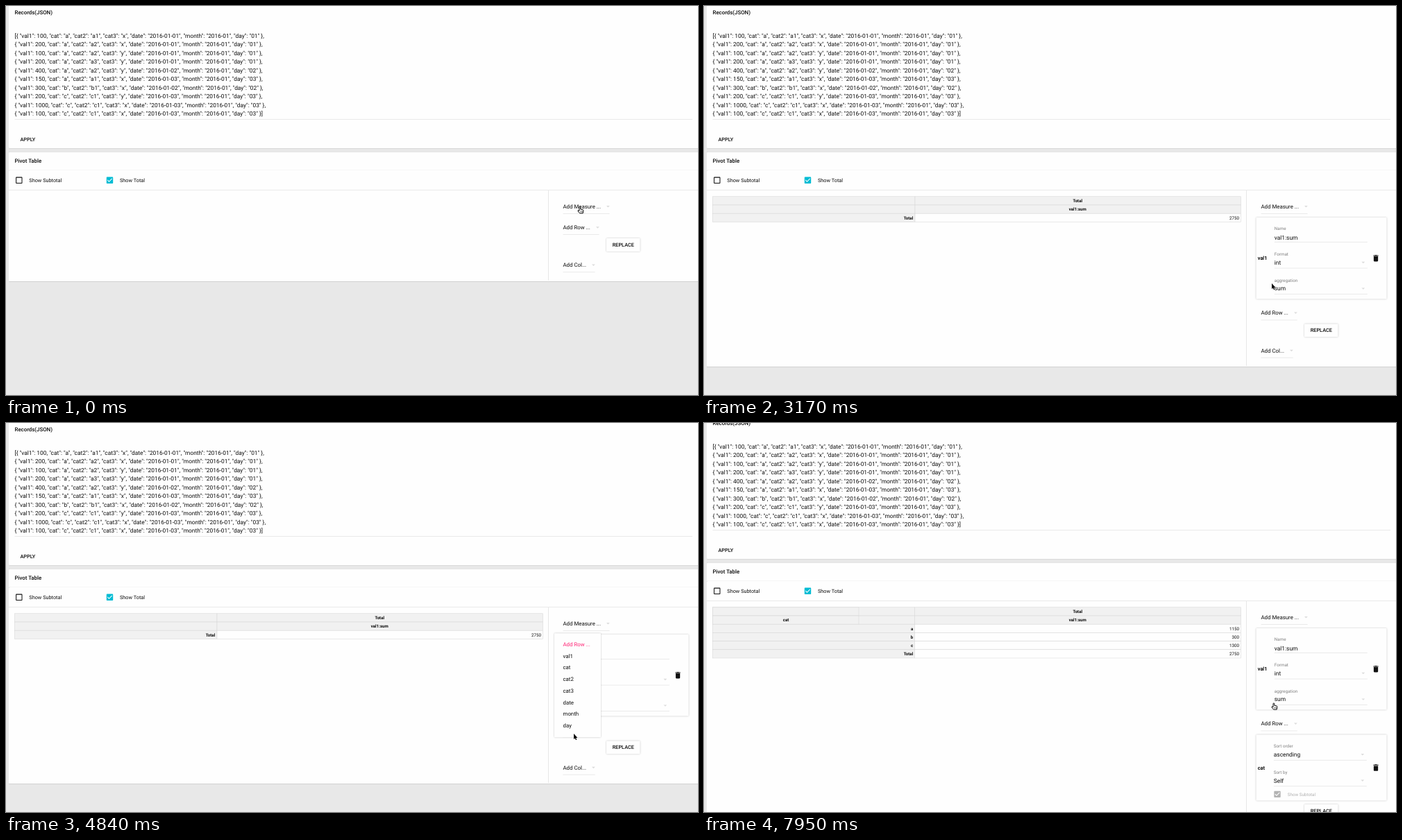
These frames come from a looping animation (997 px wide and 561 px high, 8000 ms). An HTML page:

```html
<!DOCTYPE html>
<html lang="en">
<head>
<meta charset="utf-8">
<title>Pivot table</title>
<style>
html, body { margin: 0; width: 100%; height: 100%; overflow: hidden; background: #e8e8e8; }
svg { display: block; width: 997px; height: 561px; font-family: Roboto, sans-serif; text-rendering: geometricPrecision; white-space: pre; }
.paper { fill: #fefefe; filter: drop-shadow(0 .9px .6px rgba(0,0,0,.45)); }
.raised { fill: #fefefe; filter: drop-shadow(0 .7px .9px rgba(0,0,0,.24)); }
</style>
</head>
<body>
<svg id="stage" viewBox="0 0 997 561"></svg>
<script>
const LOOP = 8000;
const INK = '#0c0c0c', LABEL = '#808080', RULE = '#e2e2e2', PINK = '#ff2475';
const SMALL = 6.28, BODY = 7.32, MEDIUM = 7.85, LARGE = 8.37;
const FIELDS = ['val1', 'cat', 'cat2', 'cat3', 'date', 'month', 'day'];
const ROW_H = 16.72;

const RECORDS = [
  [100, 'a', 'a1', 'x', 1], [200, 'a', 'a2', 'x', 1], [100, 'a', 'a2', 'y', 1],
  [200, 'a', 'a3', 'y', 1], [400, 'a', 'a2', 'y', 2], [150, 'a', 'a1', 'x', 3],
  [300, 'b', 'b1', 'x', 2], [200, 'c', 'c1', 'y', 3], [1000, 'c', 'c1', 'x', 3],
  [100, 'c', 'c1', 'x', 3]
].map(([val, cat, cat2, cat3, day], i, all) =>
  `${i ? '' : '['}{ "val1": ${val}, "cat": "${cat}", "cat2": "${cat2}", "cat3": "${cat3}", ` +
  `"date": "2016-01-0${day}", "month": "2016-01", "day": "0${day}" }${i < all.length - 1 ? ',' : ']'}`);

const ICON = {
  box: 'M19 5v14H5V5h14m0-2H5c-1.1 0-2 .9-2 2v14c0 1.1.9 2 2 2h14c1.1 0 2-.9 2-2V5c0-1.1-.9-2-2-2z',
  checked: 'M19 3H5c-1.11 0-2 .9-2 2v14c0 1.1.89 2 2 2h14c1.11 0 2-.9 2-2V5c0-1.1-.89-2-2-2zm-9 14l-5-5 1.41-1.41L10 14.17l7.59-7.59L19 8l-9 9z',
  trash: 'M6 19c0 1.1.9 2 2 2h8c1.1 0 2-.9 2-2V7H6v12zM19 4h-3.5l-1-1h-5l-1 1H5v2h14V4z'
};
const CURSOR = {
  hand: '<path d="M-1 .8C-1-.3.8-.3.8.8V3.4L4 4Q5.1 4.3 4.9 5.5L4.2 9.2H-.4L-2.9 6.2Q-3.3 4.6-2 4.9L-1 5.8Z" fill="#fff" stroke="#000" stroke-width=".95" stroke-linejoin="round"/>' +
    '<path d="M.9 5.6V7.8M2.1 5.6V7.8M3.3 5.6V7.8" stroke="#000" stroke-width=".5"/>',
  arrow: '<path d="M0 0V8L1.8 6.4 3 9.2 4.3 8.6 3.1 5.9H5.4Z" stroke="#fff" stroke-width=".8" paint-order="stroke"/>'
};

// Timelines: [start ms, value], each held until the next entry
const POINTER = [
  [0, ['hand', 827, 289.7]], [210, ['hand', 830.5, 290.2]], [770, ['hand', 829, 292]],
  [1130, ['hand', 827, 298]], [1300, ['hand', 826, 302]], [1480, ['hand', 825.3, 306.3]],
  [2990, ['arrow', 821, 356]], [3170, ['arrow', 818, 400]], [3560, ['arrow', 818, 412]],
  [3730, ['arrow', 818, 430]], [4120, ['arrow', 818, 448]], [5030, ['hand', 817, 432]],
  [5220, ['hand', 816, 416]], [5420, ['hand', 815, 400]], [5610, ['hand', 813, 383]],
  [5800, ['hand', 812, 366]], [5980, ['hand', 812, 353]], [7590, ['hand', 821, 404]]
];
const SCROLL = [[0, 0], [3560, -2], [3730, -1], [4120, 0], [7950, -9]];
const MEASURE_MENU = [
  [0, null], [770, { opacity: .85 }], [950, {}], [1300, { hover: 0 }],
  [2010, { hover: 0, opacity: .5, scale: .445 }], [2190, null]
];
const ROW_MENU = [
  [0, null], [4480, {}], [5030, { hover: 6 }], [5220, { hover: 5 }], [5420, { hover: 4 }],
  [5610, { hover: 3 }], [5800, { hover: 2 }], [5980, { hover: 1 }],
  [6880, { hover: 1, ripple: true }], [7120, null]
];
const at = (line, t) => line.filter(([start]) => start <= t).pop()[1];

// y is the vertical middle of the capitals
const text = (s, x, y, size, { fill = INK, weight = 400, anchor = 'start' } = {}) =>
  `<text x="${x}" y="${y + size * .36}" font-size="${size}" font-weight="${weight}" fill="${fill}" text-anchor="${anchor}">${s}</text>`;
const rect = (x, y, w, h, fill, extra = '') =>
  `<rect x="${x}" y="${y}" width="${w}" height="${h}" fill="${fill}" ${extra}/>`;
const box = (cls, x, y, w, h) => `<rect class="${cls}" x="${x}" y="${y}" width="${w}" height="${h}" rx="1"/>`;
const line = (x1, x2, y) => rect(x1, y - .3, x2 - x1, .7, RULE);
const icon = (name, x, y, fill) =>
  `<path d="${ICON[name]}" fill="${fill}" transform="translate(${x} ${y}) scale(.523) translate(-12 -12)"/>`;
const caret = (x, y) => `<path d="M${x - 2.4} ${y - 1}h4.8l-2.4 2.4z" fill="#dcdcdc"/>`;
const shift = (y, body) => `<g transform="translate(0 ${y})">${body}</g>`;

const dropdown = (label, y, right) =>
  text(label, 802.5, y, MEDIUM) + caret(right - 2.2, y) + line(802.5, right, y + 10.3);

const button = (label, y) => box('raised', 865, y - 9.3, 48.5, 18.8) +
  text(label, 889.3, y, BODY, { weight: 500, anchor: 'middle' });

const field = (label, value, x, y, isSelect = true) =>
  text(label, x, y, SMALL, { fill: LABEL }) +
  text(value, x, y + (isSelect ? 12 : 13.4), LARGE) +
  line(x, x + 134, y + 20.2) + (isSelect ? caret(x + 128, y + 12) : '');

function settingsCard(name, y, h, middle, body) {
  return box('raised', 795.5, y, 188, h) +
    text(name, 797.8, middle, BODY, { weight: 700 }) + icon('trash', 968, middle, '#111') + body;
}

function table(hasRows) {
  const top = 274.8, h = 12.2, left = 12.5, split = hasRows ? 303.3 : 304, right = 773.5;
  const rows = hasRows ? [['a', 1150], ['b', 300], ['c', 1300], ['Total', 2750]] : [['Total', 2750]];
  const cell = (x1, x2, row, fill) =>
    rect(x1, top + row * h, x2 - x1, h, fill, 'stroke="#d6d6d6" stroke-width=".55"');
  const bold = (s, x, row, anchor) => text(s, x, top + (row + .5) * h, 6.15, { weight: 700, anchor });
  let out = '';
  for (const row of [0, 1]) {
    out += cell(left, split, row, '#f1f1f1') + cell(split, right, row, '#f1f1f1');
    if (hasRows) out += cell(left, 223, row, '#f1f1f1');
    out += bold(row ? 'val1:sum' : 'Total', 538.3, row, 'middle');
  }
  if (hasRows) out += bold('cat', 118, 1, 'middle');
  rows.forEach(([label, value], i) => {
    const row = i + 2;
    out += cell(left, split, row, '#f1f1f1') + cell(split, right, row, '#fefefe') +
      bold(label, 301.3, row, 'end') +
      text(value, 771, top + (row + .5) * h, SMALL, { anchor: 'end' });
  });
  return out;
}

function page(hasMeasure, hasRows) {
  const rowShift = hasMeasure ? 123.3 : 0;
  const colShift = rowShift + (hasRows ? 100.6 : 0);
  const bottom = 397.3 + colShift;
  let out = box('paper', 4, -30, 1000, 235.3) +
    text('Records(JSON)', 12.5, 8.8, MEDIUM, { weight: 500 }) +
    RECORDS.map((r, i) => text(r, 12.5, 42.6 + i * 12.54, LARGE)).join('') +
    line(12.5, 989, 163.5) +
    text('APPLY', 20.5, 192.2, BODY, { weight: 500 }) +
    box('paper', 4, 210.3, 1000, bottom - 210.3) +
    text('Pivot Table', 12.5, 223.5, MEDIUM, { weight: 500 }) +
    box('paper', 4, 237, 1000, bottom - 237) +
    rect(4.5, 230, 993, 6.3, '#fefefe') + rect(4, 236.3, 993, .7, '#f2f2f2') +
    icon('box', 18.8, 251.3, '#111') + text('Show Subtotal', 33.3, 251.3, BODY) +
    icon('checked', 149.5, 251.3, '#00bcd4') + text('Show Total', 164, 251.3, BODY) +
    line(4, 997, 265.3) + rect(781, 266, .8, bottom - 267.5, RULE) +
    dropdown('Add Measure ...', 289, 869.6);
  if (hasMeasure) {
    out += table(hasRows) + settingsCard('val1', 305, 117.5, 363.7,
      field('Name', 'val1:sum', 821.8, 320.4, false) +
      field('Format', 'int', 821.8, 357.8) +
      field('aggregation', 'sum', 821.8, 395.4));
  }
  out += shift(rowShift, dropdown('Add Row ...', 319.3, 854.6));
  if (hasRows) {
    out += settingsCard('cat', 458.5, 95, 506,
      field('Sort order', 'ascending', 820.8, 475) +
      field('Sort by', 'Self', 820.8, 512.6) +
      icon('checked', 826, 544.4, '#b3b3b3') +
      text('Show Subtotal', 840.8, 544.4, SMALL, { fill: '#b0b0b0' }));
  }
  return out + shift(colShift, button('REPLACE', 344.4) + dropdown('Add Col...', 373.5, 848.6));
}

function menu(title, y, w, state) {
  if (!state) return '';
  const { hover = -1, ripple = false, opacity = 1, scale = 1 } = state;
  const rowY = i => 24.4 + i * ROW_H;
  let out = box('raised', 790, 0, w, 150);
  if (hover >= 0) out += rect(790, rowY(hover), w, ROW_H, '#e7e7e7');
  if (ripple) {
    const mid = rowY(hover) + ROW_H / 2, half = ROW_H / 2;
    out += `<path d="M795 ${mid - half}H831Q835 ${mid} 831 ${mid + half}H795Q791 ${mid} 795 ${mid - half}Z" fill="#d2d2d2"/>`;
  }
  out += text(title, 802.5, 16, MEDIUM, { fill: PINK }) +
    FIELDS.map((f, i) => text(f, 802.5, rowY(i) + ROW_H / 2 - .1, MEDIUM)).join('');
  return `<g transform="translate(0 ${y}) scale(1 ${scale})" opacity="${opacity}">${out}</g>`;
}

const pointer = ([kind, x, y]) => `<g transform="translate(${x} ${y})">${CURSOR[kind]}</g>`;

function scene(t) {
  const hasBar = t >= 3560 && t < 4840;
  return rect(0, 0, 997, 561, '#e8e8e8') +
    shift(at(SCROLL, t), page(t >= 2010, t >= 7120)) +
    (hasBar ? rect(996, 12, 1, 549, '#b4b4b4') : '') +
    menu('Add Measure ...', 275, 100.5, at(MEASURE_MENU, t)) +
    menu('Add Row ...', 303.2, 67, at(ROW_MENU, t)) +
    pointer(at(POINTER, t));
}

const stage = document.getElementById('stage');
const start = performance.now();
let shown = '';
function render(now) {
  const next = scene(Math.max(0, now - start) % LOOP);
  if (next !== shown) stage.innerHTML = shown = next;
  requestAnimationFrame(render);
}
render(start);
</script>
</body>
</html>
```
